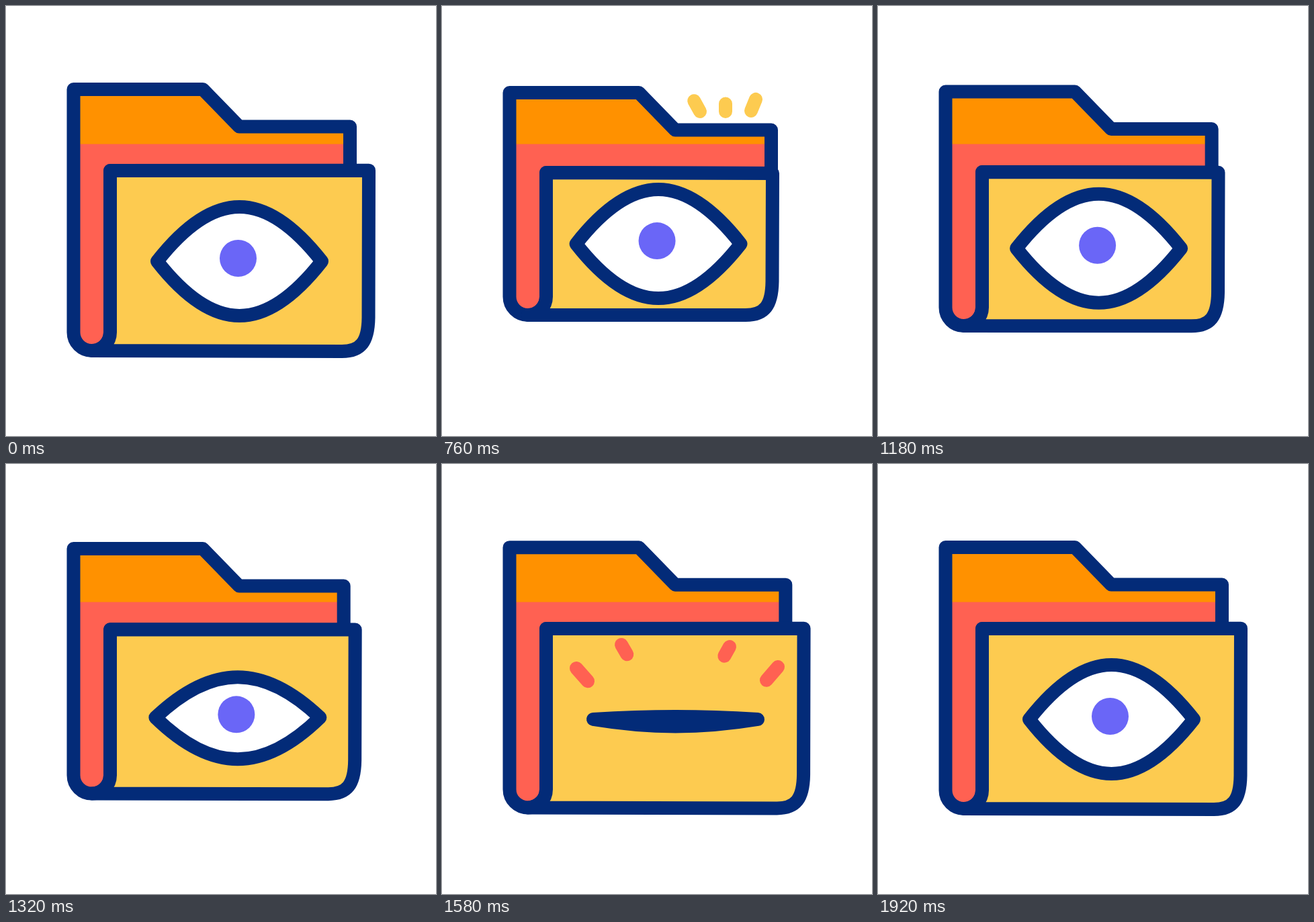
An HTML page with a canvas that plays this animation: 640 by 640 pixels, repeating every 2.38 s.

```html
<!DOCTYPE html>
<html lang="en">
<head>
<meta charset="utf-8">
<title>Folder with an eye</title>
<style>
  html, body { margin: 0; width: 100%; height: 100%; overflow: hidden; background: #fff; }
  canvas { display: block; width: 100vmin; height: 100vmin; }
</style>
</head>
<body>
<canvas id="stage" width="640" height="640"></canvas>
<script>
const ctx = document.getElementById('stage').getContext('2d');
const LOOP = 2380, STEP = 20;
const NAVY = '#032b78', ORANGE = '#ff9100', RED = '#ff6152',
      YELLOW = '#fdcb50', VIOLET = '#6a66f7';

const lerp = (a, b, k) => a + (b - a) * k;
const ramp = (t, a, b) => Math.min(1, Math.max(0, (t - a) / (b - a)));
const smooth = (t, a, b) => { const u = ramp(t, a, b); return u * u * (3 - 2 * u); };

// Each ray: inner end, then outer end.
const topRays = [
  [384, 157, 350, 96], [422, 157, 422, 113], [460, 156, 487, 90]
];
const frontRays = [
  [231, 339, 200, 304], [282, 295, 267, 269],
  [414, 297, 428, 272], [469, 338, 500, 302]
];

function outline(path, width = 20) {
  ctx.lineWidth = width;
  ctx.strokeStyle = NAVY;
  ctx.stroke(path);
}

function drawRays(rays, color, tail, head) {
  if (head - tail < 0.01) return;
  ctx.strokeStyle = color;
  ctx.lineWidth = 20;
  ctx.beginPath();
  for (const [x0, y0, x1, y1] of rays) {
    ctx.moveTo(lerp(x0, x1, tail), lerp(y0, y1, tail));
    ctx.lineTo(lerp(x0, x1, head), lerp(y0, y1, head));
  }
  ctx.stroke();
}

function drawFolder(p) {
  const right = lerp(540, 492, p), bottom = lerp(513, 460, p);
  const tabRight = lerp(512, 490, p), top = lerp(124, 129, p);
  const shelf = lerp(179.5, 184.5, p);
  const lipL = lerp(245, 248, p), lipR = lerp(244.7, 249, p);
  const r = 27.25, cx = 127.75, cy = bottom - r;

  const back = new Path2D();
  back.moveTo(cx - r, cy);
  back.lineTo(cx - r, top);
  back.lineTo(293, top);
  back.lineTo(347, shelf);
  back.lineTo(tabRight, shelf);
  back.lineTo(tabRight, lipR);
  back.lineTo(cx + r, lipL);
  back.lineTo(cx + r, cy);
  back.arc(cx, cy, r, 0, Math.PI);
  back.closePath();

  ctx.fillStyle = ORANGE;
  ctx.fill(back);
  ctx.save();
  ctx.clip(back);
  ctx.fillStyle = RED;
  ctx.fillRect(0, 205.5, 640, 400);
  ctx.restore();
  outline(back);

  const low = bottom + 1 - p;
  const front = new Path2D();
  front.moveTo(cx + r, lipL);
  front.lineTo(right, lipR);
  front.lineTo(right - 0.5, low - 50);
  front.bezierCurveTo(right - 1, low - 14, right - 12, low, right - 40, low);
  front.lineTo(cx, bottom);
  front.arc(cx, cy, r, Math.PI / 2, 0, true);
  front.closePath();
  ctx.fillStyle = YELLOW;
  ctx.fill(front);
  outline(front);
}

function drawEye(shift, open) {
  const up = lerp(4, 81, open), down = lerp(10.5, 81, open);
  const half = 122.5;

  ctx.save();
  ctx.translate(347.5 - 25.5 * shift, 380 - 26 * shift);
  const lens = new Path2D();
  lens.moveTo(-half, 0);
  lens.bezierCurveTo(-89.5, -up * 0.52, -48, -up, 0, -up);
  lens.bezierCurveTo(48, -up, 89.5, -up * 0.52, half, 0);
  lens.bezierCurveTo(89.5, down * 0.52, 48, down, 0, down);
  lens.bezierCurveTo(-48, down, -89.5, down * 0.52, -half, 0);
  lens.closePath();

  ctx.save();
  ctx.clip(lens);
  ctx.fillStyle = '#fff';
  ctx.fillRect(-140, -100, 280, 200);
  ctx.fillStyle = VIOLET;
  ctx.beginPath();
  ctx.arc(-2, -4.5, 27.5, 0, Math.PI * 2);
  ctx.fill();
  ctx.restore();
  outline(lens);
  ctx.restore();
}

function draw(t) {
  ctx.fillStyle = '#fff';
  ctx.fillRect(0, 0, 640, 640);
  ctx.lineJoin = ctx.lineCap = 'round';

  const shrink = 1 - Math.pow(1 - ramp(t, 600, 760), 1.2);
  const squash = shrink * (1 - smooth(t, 905, 1658));
  const shift = smooth(t, 600, 765) * (1 - smooth(t, 1080, 1380));
  const open = 1 - smooth(t, 1231, 1491) + smooth(t, 1659, 1920);

  drawRays(topRays, YELLOW, smooth(t, 810, 1020), smooth(t, 700, 880));
  drawFolder(squash);
  drawRays(frontRays, RED, smooth(t, 1510, 1660), smooth(t, 1330, 1460));
  drawEye(shift, open);
}

const start = performance.now();
function tick() {
  const t = (performance.now() - start) % LOOP;
  draw(Math.floor(t / STEP) * STEP);
  requestAnimationFrame(tick);
}
tick();
</script>
</body>
</html>
```
